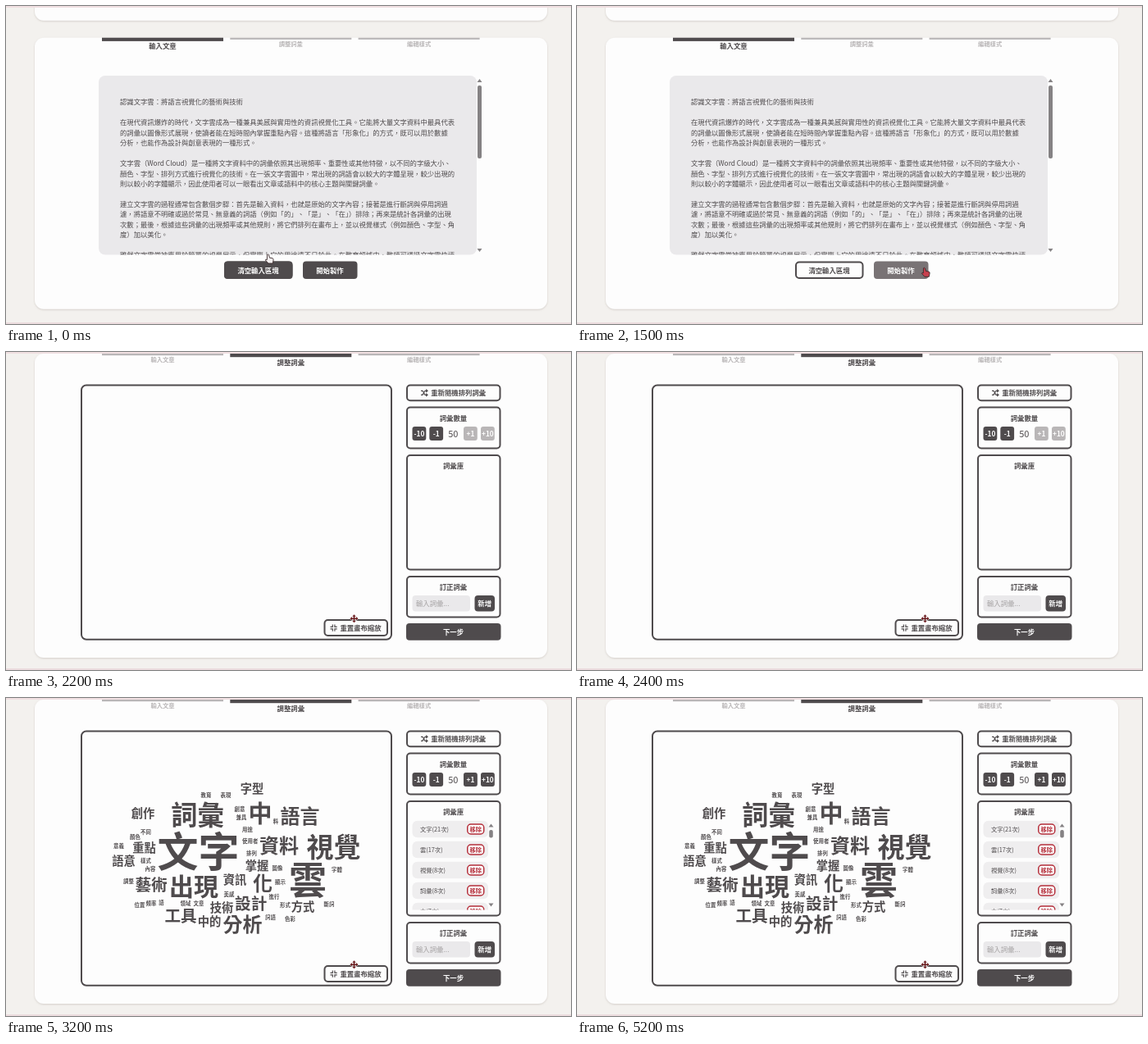
An HTML page for the animation above (5300 ms loop, 689 by 388 pixels).

```html
<!DOCTYPE html>
<html lang="zh-Hant">
<head>
<meta charset="utf-8">
<style>
  html, body { margin: 0; width: 100%; height: 100%; overflow: hidden; background: #f3f1ee; }
  svg { display: block; }
  text { font-family: "Noto Sans CJK TC", "Noto Sans CJK", sans-serif; white-space: pre; }
</style>
</head>
<body>
<svg id="stage" width="689" height="388" viewBox="0 0 689 388"></svg>
<script>
const LOOP = 5300, STEP = 100, SWITCH = 1700, WORDS_AT = 2500, PRESS_AT = 1400;
const SCROLL_TOP = 36.7;
const DARK = '#4f4b4d', GRAY = '#b9b6b7', PALE = '#eae9eb', PAPER = '#fdfdfd', RED = '#b5303c';

// Vertical position is the centre of the em box.
const label = (x, y, size, str, { color = DARK, weight = 700, anchor = 'middle' } = {}) =>
  `<text x="${x}" y="${y + size * 0.38}" font-size="${size}" font-weight="${weight}" fill="${color}" text-anchor="${anchor}">${str}</text>`;
const rect = (x, y, w, h, r, fill, extra = '') =>
  `<rect x="${x}" y="${y}" width="${w}" height="${h}" rx="${r}" fill="${fill}" ${extra}/>`;
const outline = (x, y, w, h, r, line = 2, color = DARK) =>
  rect(x + line / 2, y + line / 2, w - line, h - line, r, PAPER, `stroke="${color}" stroke-width="${line}"`);
const group = (id, body, extra = '') => `<g id="${id}" ${extra}>${body}</g>`;
const arrow = (x, y, dir) =>
  `<path d="M${x - 3} ${y + 2 * dir}h6l-3 ${-4 * dir}z" fill="#858284"/>`;

const tabs = active => ['輸入文章', '調整詞彙', '編輯樣式'].map((name, i) => {
  const x = 117 + 156.3 * i, on = i === active;
  return rect(x, 2, 148, on ? 4.2 : 2.2, 0, on ? DARK : GRAY) +
    label(x + 74, on ? 12.4 : 9.4, on ? 8.4 : 7.3, name, { color: on ? DARK : GRAY });
}).join('');

const card = height =>
  rect(35, -60, 625, 41, 11, PAPER, 'filter="url(#shadow)"') +
  rect(35, 2, 625, height, 11, PAPER, 'filter="url(#shadow)"');

const article = `認識文字雲：將語言視覺化的藝術與技術

在現代資訊爆炸的時代，文字雲成為一種兼具美感與實用性的資訊視覺化工具。它能將大量文字資料中最具代表
的詞彙以圖像形式展現，使讀者能在短時間內掌握重點內容。這種將語言「形象化」的方式，既可以用於數據
分析，也能作為設計與創意表現的一種形式。

文字雲（Word Cloud）是一種將文字資料中的詞彙依照其出現頻率、重要性或其他特徵，以不同的字級大小、
顏色、字型、排列方式進行視覺化的技術。在一張文字雲圖中，常出現的詞語會以較大的字體呈現，較少出現的
則以較小的字體顯示，因此使用者可以一眼看出文章或語料中的核心主題與關鍵詞彙。

建立文字雲的過程通常包含數個步驟：首先是輸入資料，也就是原始的文字內容；接著是進行斷詞與停用詞過
濾，將語意不明確或過於常見、無意義的詞語（例如「的」、「是」、「在」）排除；再來是統計各詞彙的出現
次數；最後，根據這些詞彙的出現頻率或其他規則，將它們排列在畫布上，並以視覺樣式（例如顏色、字型、角
度）加以美化。

雖然文字雲常被應用於簡單的視覺展示，但實際上它的用途遠不只於此。在教育領域中，教師可透過文字雲快速`;

function inputPage() {
  const lines = article.split('\n').map((line, i) =>
    label(139, 117 + 12.48 * i, 8.33, line, { weight: 500, anchor: 'start' })).join('');
  return group('', card(331) + tabs(0), `transform="translate(0 ${SCROLL_TOP})"`) +
    rect(113, 85, 461, 218.5, 8, PALE) +
    group('', lines, 'clip-path="url(#articleClip)"') +
    arrow(577.5, 91, 1) + rect(575, 97, 5, 89, 2, '#858284') + arrow(577.5, 298, -1) +
    outline(266, 311.5, 83.5, 21.5, 4) +
    rect(266, 311.5, 83.5, 21.5, 4, DARK, 'id="clearHover"') +
    `<g id="clearLabel">${label(307.5, 322.4, 8.4, '清空輸入區塊', { color: 'inherit' })}</g>` +
    rect(362, 311.5, 66.5, 21.5, 4, DARK, 'id="start"') +
    label(395, 322.4, 8.4, '開始製作', { color: '#fff' });
}

// size: word,x,y entries
const cloud = {
  50: '文字,234.5,187', 46: '雲,368,222', 33: '視覺,399.5,181', 32.5: '詞彙,233.5,142.5',
  30: '出現,229,230', 29: '中,310,141',
  24: '語言,358.5,144 資料,333,179.5 分析,288.5,276 化,313,226',
  19.6: '設計,298.7,250.5 藝術,177,228 工具,213,265.5',
  14.3: '創作,167,141 重點,168.5,183 語意,143.5,199 字型,300,110.5 掌握,306,204.5 資訊,279,222 ' +
    '技術,263,255.5 中的,248,272.5 方式,362,254.5',
  6.4: '教育,244,118.5 表現,268,119 創意,285,135.5 兼具,287,146 料,329,151 用途,294.5,160.5 使用者,297.7,175 ' +
    '排列,299.5,190 圖像,331,207.5 字體,403.5,209.5 顯示,334.5,225 美感,272,240 進行,327,243 形式,340.5,253 ' +
    '斷詞,394,251.5 詞語,322.5,267.5 色彩,346.5,269.5 不同,170.5,164 顏色,157.5,170 意義,137.5,181 樣式,170.5,199 ' +
    '內容,176,209 調整,149.5,224 位置,163,252.5 頻率,177,251 語,189.5,250 領域,219,250.5 文章,235,250.5'
};

const cloudWords = () => Object.entries(cloud).map(([size, list]) =>
  list.split(' ').map(item => {
    const [word, x, y] = item.split(',');
    return label(x, +y, +size, word);
  }).join('')).join('');

const libraryList = () => group('', ['文字(21次)', '雲(17次)', '視覺(8次)', '詞彙(8次)', '中(7次)'].map((word, i) => {
  const y = 160 + 25 * i;
  return rect(495.5, y - 10.3, 92.5, 20.6, 6, '#efeeef') +
    label(505, y, 7.3, word, { weight: 500, anchor: 'start' }) +
    outline(562, y - 6.7, 21.5, 13.4, 4, 1.5, RED) + label(572.8, y, 7.3, '移除', { color: RED });
}).join(''), 'clip-path="url(#listClip)"') +
  arrow(591.5, 155.5, 1) + rect(589.2, 161, 4.6, 9.5, 2, '#858284') + arrow(591.5, 252.5, -1);

const countButton = (x, str, fill) =>
  rect(x, 91, 16.8, 17, 3, fill) + label(x + 8.4, 99.5, 8.3, str, { color: '#fff' });
const plusButtons = fill => countButton(558, '+1', fill) + countButton(579, '+10', fill);
const icon = d => `<path d="${d}" fill="none" stroke="${DARK}" stroke-width="1.2"/>`;

function adjustPage() {
  const shuffle = icon('M506 47.3h2l3 5h2.5M506 52.3h2l3 -5h2.5M512.2 45.6l1.8 1.7l-1.8 1.7M512.2 50.6l1.8 1.7l-1.8 1.7');
  const compress = icon('M398.3 332.5v2.8h-2.8M400.9 332.5v2.8h2.8M398.3 340.7v-2.8h-2.8M400.9 340.7v-2.8h2.8');
  return card(371) + label(81.5, -33.5, 15, '裝雲') + tabs(1) +
    outline(91, 39.5, 380, 312.3, 6) +
    outline(488, 39.5, 115.5, 20.8, 4) + shuffle + label(551.7, 49.8, 8.4, '重新隨機排列詞彙') +
    outline(488, 66.5, 115.5, 52, 4) + label(545.5, 81, 8.4, '詞彙數量') +
    countButton(495.5, '-10', DARK) + countButton(516.3, '-1', DARK) +
    label(545.3, 99.5, 11, '50', { weight: 500 }) + plusButtons(GRAY) +
    outline(488, 125, 115.5, 141.5, 4) + label(545.5, 139, 8.4, '詞彙庫') +
    outline(488, 273, 115.5, 51.5, 4) + label(545.5, 287, 8.4, '訂正詞彙') +
    rect(495.5, 297, 70.5, 19.5, 4, PALE) +
    label(500, 306.8, 8.4, '輸入詞彙...', { color: '#a5a2a3', weight: 500, anchor: 'start' }) +
    rect(571.5, 297, 24.5, 19.5, 4, DARK) + label(583.7, 306.8, 8.4, '新增', { color: '#fff' }) +
    rect(488, 331, 115.5, 20.8, 4, DARK) + label(545.5, 341.4, 8.4, '下一步', { color: '#fff' }) +
    group('words', cloudWords() + plusButtons(DARK) + libraryList()) +
    outline(387.5, 326, 78.5, 21, 4) + compress + label(432.5, 336.5, 8.4, '重置畫布縮放');
}

const hand = '<path d="M-2 -5.5q1.2 -1 2 .3l1 3.4l3.6 .6q1.2 .5 1 2l-.8 4.2h-5.4l-3.6 -4q.2 -1.4 2 -.4z" ' +
  'stroke="#3b2a2c" stroke-width=".9"/>';
const move = '<path d="M0 -5l2.2 2.4h-1.4v1.8h1.8v-1.4l2.4 2.2l-2.4 2.2v-1.4h-1.8v1.8h1.4l-2.2 2.4l-2.2 -2.4h1.4v-1.8h-1.8v1.4' +
  'l-2.4 -2.2l2.4 -2.2v1.4h1.8v-1.8h-1.4z" fill="#6b1d20" stroke="#fff" stroke-width="1" paint-order="stroke"/>';

const stage = document.getElementById('stage');
stage.innerHTML = `<defs>
  <filter id="shadow" x="-5%" y="-10%" width="110%" height="125%"><feDropShadow dx="0" dy="1" stdDeviation="1" flood-color="#8a7f78" flood-opacity=".3"/></filter>
  <clipPath id="articleClip"><rect x="113" y="85" width="461" height="218.5"/></clipPath>
  <clipPath id="listClip"><rect x="489" y="148" width="113" height="110.5"/></clipPath>
  </defs>` + rect(0, 0, 689, 388, 0, '#f3f1ee') +
  group('inputPage', inputPage()) + group('adjustPage', adjustPage()) +
  rect(0, 0, 689, 2, 0, '#f0dfe1') + rect(0, 386, 689, 2, 0, '#ecdcde') +
  group('cursor', group('hand', hand) + group('move', move));

const el = id => document.getElementById(id);
const show = (id, on) => el(id).setAttribute('display', on ? 'inline' : 'none');
const ease = (t, from, to) => {
  const p = Math.min(1, Math.max(0, (t - from) / (to - from)));
  return (1 - Math.cos(Math.PI * p)) / 2;
};

function draw(t) {
  const adjusting = t >= SWITCH;
  const travel = ease(t, 300, 1000);
  const x = 320.5 + 104 * travel, y = 309 + 16.3 * travel;
  const onClear = x < 349, onStart = x > 362;

  show('inputPage', !adjusting);
  show('adjustPage', adjusting);
  show('words', t >= WORDS_AT);
  el('adjustPage').setAttribute('transform', `translate(0 ${SCROLL_TOP * (1 - ease(t, 1830, 2180))})`);

  show('clearHover', onClear);
  el('clearLabel').firstChild.setAttribute('fill', onClear ? '#fff' : DARK);
  el('start').setAttribute('fill', onStart ? '#797375' : DARK);

  show('hand', !adjusting);
  show('move', adjusting);
  el('hand').setAttribute('fill', t >= PRESS_AT ? '#c8404e' : '#f4f0f0');
  el('cursor').setAttribute('transform', `translate(${x} ${y})`);
}

function tick() {
  draw(Math.floor(performance.now() % LOOP / STEP) * STEP);
  requestAnimationFrame(tick);
}
tick();
</script>
</body>
</html>
```
